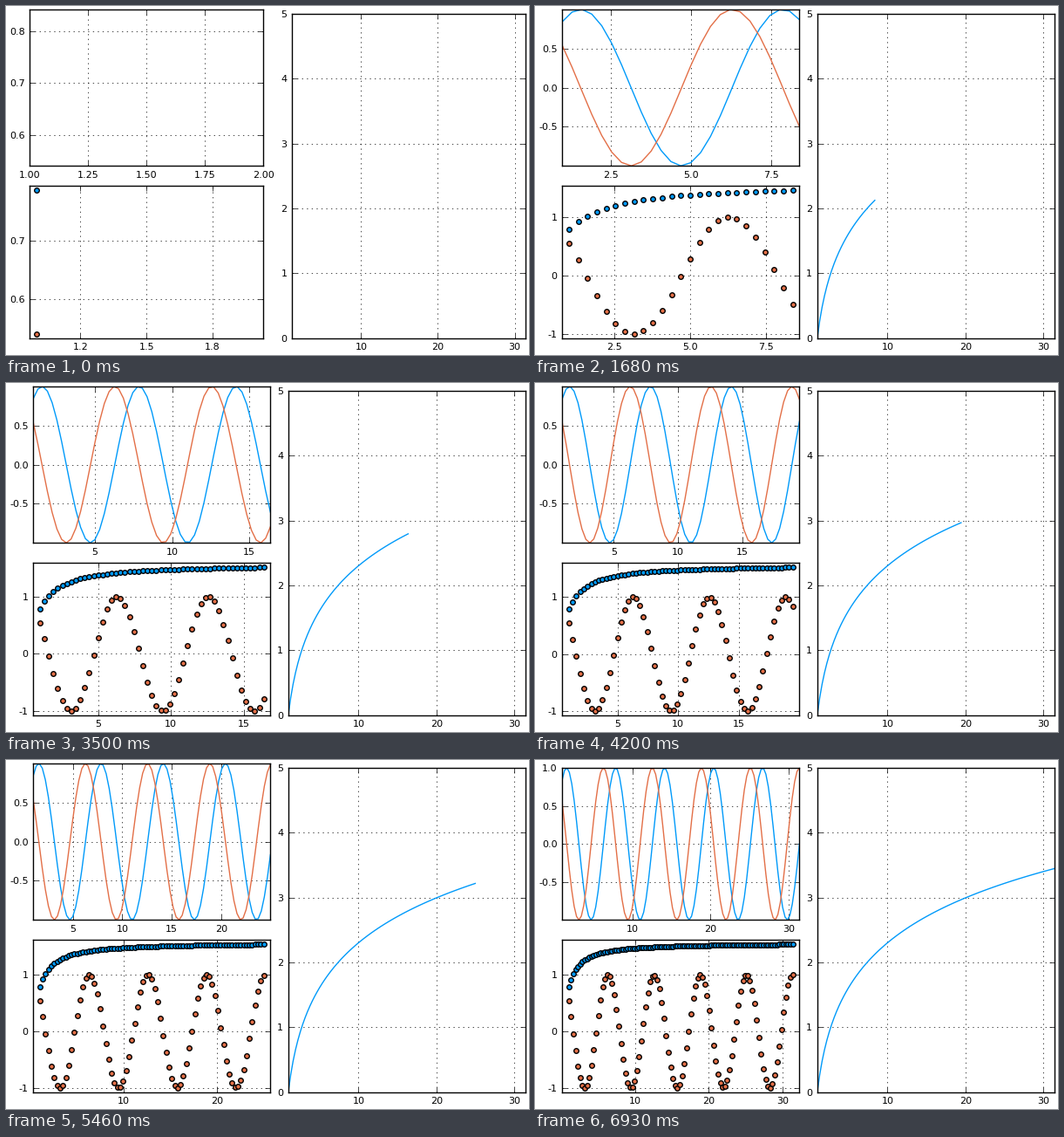
Animation, 600 px wide and 400 px high, one loop 7000 ms. Source, as a matplotlib script:

```python
import math

import matplotlib.pyplot as plt
import numpy as np
from matplotlib.animation import FuncAnimation

W, H, DPI = 600, 400, 100
STEPS, INTERVAL = 100, 70
BLUE = (0.0, 0.6056, 0.9787)
ORANGE = (0.8889, 0.4356, 0.2781)

MARGIN = DPI / 25.4          # one millimetre in pixels
EM = 8 * DPI / 72
TICK_PAD = 4 * DPI / 72
HALF_LINE = 5.0              # half the height of a tick label
BOTTOM_PAD = 19.3
NICE = ((1, 1.0), (5, 0.9), (2, 0.7), (2.5, 0.5), (3, 0.2))

plt.style.use("classic")
plt.rcParams.update({
    "font.family": "DejaVu Sans",
    "font.size": 8,
    "xtick.labelsize": 8,
    "ytick.labelsize": 8,
    "ytick.alignment": "center_baseline",
    "axes.axisbelow": True,
    "axes.grid": True,
    "axes.unicode_minus": False,
    "lines.linewidth": 1,
    "figure.facecolor": "white",
    "toolbar": "None",
})

xs = np.linspace(1, 10 * math.pi, STEPS)


def best_step(lo, hi):
    """Pick the tick step that scores best for count, zero, coverage and niceness."""
    extent = hi - lo
    top = math.ceil(math.log10(extent))
    best, choice = -math.inf, extent
    for z in (top, top - 1, top - 2):
        for k in range(5, 17):
            for q, nice in NICE:
                step = q * 10.0 ** z
                span = (k - 1) * step
                first = math.ceil((hi - span) / step - 1e-9)
                last = math.floor(lo / step + 1e-9)
                if first > last or span >= 2 * extent * (1 - 1e-9):
                    continue
                has_zero = first <= 0 and last > -k
                count = max(0, 1 - abs(k - 5) / 5)
                score = (count / 4 + has_zero / 6
                         + 0.5 * extent / span + nice / 4)
                if score > best + 1e-9:
                    best, choice = score, step
    return choice


def make_ticks(lo, hi):
    step = best_step(lo, hi)
    first = math.ceil(lo / step - 1e-9)
    last = math.floor(hi / step + 1e-9)
    ticks = [n * step for n in range(first, last + 1)]
    digits = 0
    while any(abs(t - round(t, digits)) > 1e-9 for t in ticks):
        digits += 1
    return ticks, [f"{t + 0.0:.{digits}f}" for t in ticks]


def text_width(s):
    return EM * sum({".": 0.318, "-": 0.361}.get(c, 0.636) for c in s)


def widen(lo, hi):
    pad = 0.03 * (hi - lo)
    return lo - pad, hi + pad


def set_axes(ax, xlim, ylim):
    """Set limits and ticks; return the left, right and top room the labels need."""
    xt, xl = make_ticks(*xlim)
    yt, yl = make_ticks(*ylim)
    ax.set_xticks(xt, xl)
    ax.set_yticks(yt, yl)
    ax.set_xlim(*xlim)
    ax.set_ylim(*ylim)
    left = TICK_PAD + max(map(text_width, yl), default=0)
    right = max((text_width(s) / 2 - (xlim[1] - t) / (xlim[1] - xlim[0]) * W
                 for t, s in zip(xt, xl)), default=0)
    top = max((HALF_LINE - (ylim[1] - t) / (ylim[1] - ylim[0]) * H
               for t in yt), default=0)
    return MARGIN + left, MARGIN + max(0, right), MARGIN + max(0, top)


def place(ax, left, top, width, bottom):
    ax.set_position([left / W, 1 - bottom / H, width / W, (bottom - top) / H])


fig = plt.figure(figsize=(W / DPI, H / DPI), dpi=DPI)
wave_ax, dot_ax, log_ax = (fig.add_axes([0, 0, 1, 1], label=n)
                           for n in ("waves", "dots", "log"))
sin_line, = wave_ax.plot([], [], color=BLUE)
cos_line, = wave_ax.plot([], [], color=ORANGE)
log_line, = log_ax.plot([], [], color=BLUE)
atan_dots, cos_dots = (
    dot_ax.scatter([], [], s=16, c=[color], edgecolors="black", linewidths=1)
    for color in (BLUE, ORANGE))
log_pads = set_axes(log_ax, (1, 10 * math.pi), (0, 5))


def update(i):
    x = xs[:i + 1]
    sin, cos, atan = np.sin(x), np.cos(x), np.arctan(x)
    sin_line.set_data(x, sin)
    cos_line.set_data(x, cos)
    log_line.set_data(x, np.log(x))
    atan_dots.set_offsets(np.column_stack((x, atan)))
    cos_dots.set_offsets(np.column_stack((x, cos)))

    xlim = (1, x[-1] if i else 2)
    wave_y = min(sin.min(), cos.min()), max(sin.max(), cos.max())
    dot_y = min(atan.min(), cos.min()), max(atan.max(), cos.max())
    wave = set_axes(wave_ax, xlim, wave_y)
    dot = set_axes(dot_ax, widen(*xlim), widen(*dot_y))

    left, right = max(wave[0], dot[0]), max(wave[1], dot[1])
    width = (W - left - right - log_pads[0] - log_pads[1]) / 2
    floor = H - BOTTOM_PAD
    top = max(wave[2], log_pads[2])
    height = (floor - top - BOTTOM_PAD - dot[2]) / 2
    place(wave_ax, left, wave[2], width, top + height)
    place(dot_ax, left, floor - height, width, floor)
    place(log_ax, W - log_pads[1] - width, log_pads[2], width, floor)
    return sin_line, cos_line, log_line, atan_dots, cos_dots


anim = FuncAnimation(fig, update, frames=STEPS, interval=INTERVAL,
                     repeat=True, repeat_delay=0, blit=False)
plt.show()
```
